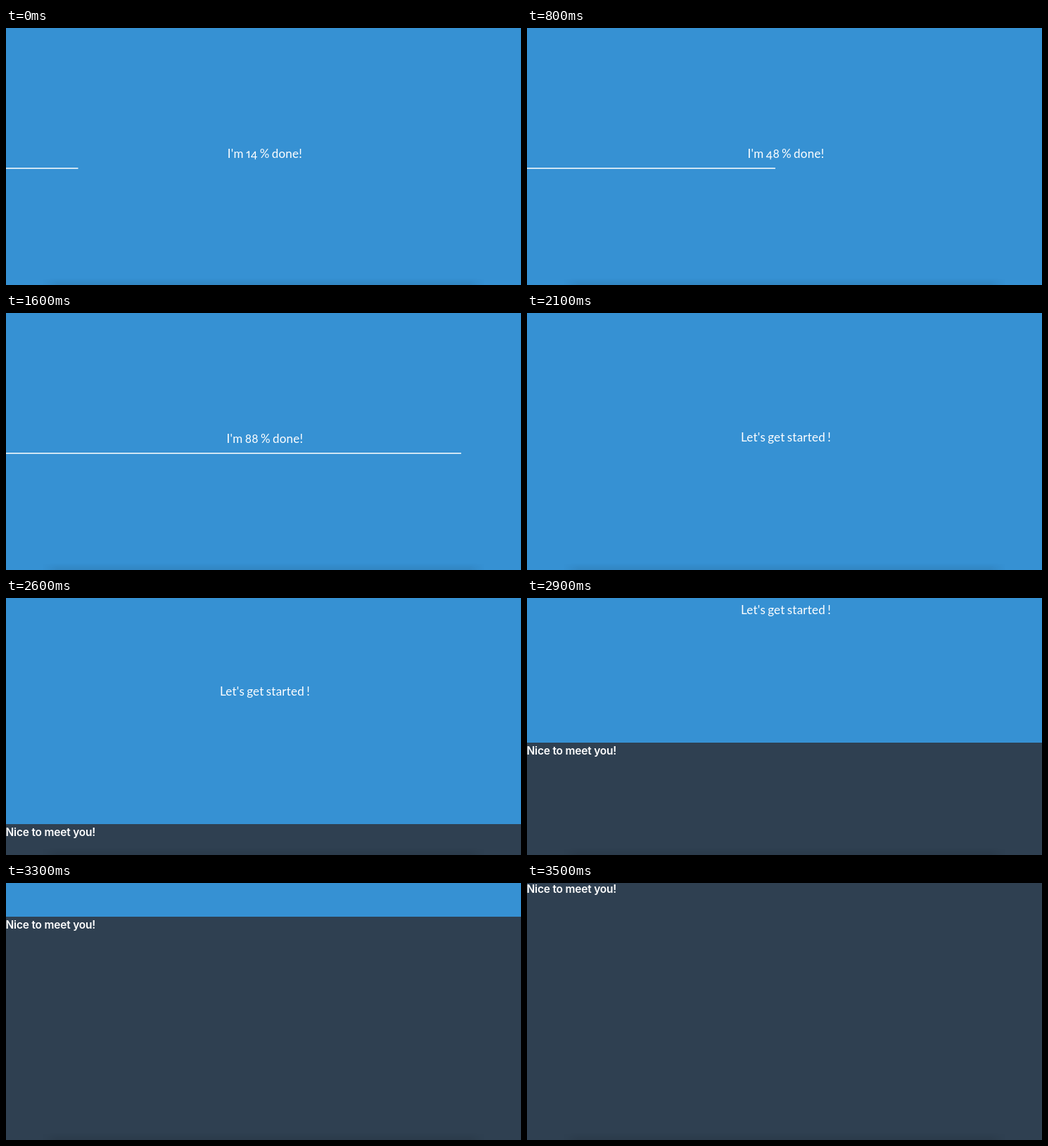
Recreate the animation shown at these times as an HTML page. Size 732 by 366 pixels, loop 4500 ms.

```html
<!DOCTYPE html>
<html lang="en">
<head>
<meta charset="utf-8">
<title>Loading</title>
<style>
  html, body { margin: 0; width: 100%; height: 100%; overflow: hidden; background: #2f4051; }
  svg { display: block; width: 732px; height: 366px; }
  text { fill: #fff; white-space: pre; }
  .status { font: 400 17px Lato, sans-serif; letter-spacing: .25px; word-spacing: -1.5px; font-variant-numeric: oldstyle-nums proportional-nums; text-anchor: middle; }
  .greeting { font: 600 15.5px Inter, sans-serif; letter-spacing: -.2px; }
</style>
</head>
<body>
<svg viewBox="0 0 732 366">
  <defs>
    <linearGradient id="shade" x2="0" y2="1">
      <stop offset="0" stop-color="#000" stop-opacity="0"/>
      <stop offset=".5" stop-color="#000" stop-opacity=".045"/>
      <stop offset="1" stop-color="#000" stop-opacity=".075"/>
    </linearGradient>
    <linearGradient id="sides">
      <stop offset=".07" stop-color="#000"/>
      <stop offset=".1" stop-color="#fff"/>
      <stop offset=".9" stop-color="#fff"/>
      <stop offset=".93" stop-color="#000"/>
    </linearGradient>
    <mask id="fade"><rect y="350" width="732" height="16" fill="url(#sides)"/></mask>
  </defs>
  <g id="page">
    <rect width="732" height="366" fill="#3691d3"/>
    <rect y="366" width="732" height="380" fill="#2f4051"/>
    <rect id="bar" y="199" height="1.5" fill="#fff"/>
    <text id="status" class="status" x="368"></text>
    <text class="greeting" x="-.5" y="382.5">Nice to meet you!</text>
  </g>
  <rect y="356" width="732" height="10" fill="url(#shade)" mask="url(#fade)"/>
</svg>
<script>
  const LOOP = 4500, STEP = 100, WIDTH = 732, DONE = 1900;
  const [page, bar, status] = ['page', 'bar', 'status'].map(id => document.getElementById(id));

  // [time, value] points, linear in between
  const barPath = [[100, 102.5], [800, 353], [1300, 530], [1600, 647], [1800, 725], [1900, WIDTH]];
  const barFade = [[1800, 1], [2100, 0]];
  const scrollPath = [[2400, 0], [2500, 13], [2600, 44], [2900, 160], [3000, 199],
                      [3100, 242], [3300, 318], [3400, 352], [3500, 369]];

  function valueAt(points, t) {
    if (t <= points[0][0]) return points[0][1];
    for (let i = 1; i < points.length; i++) {
      const [t0, v0] = points[i - 1], [t1, v1] = points[i];
      if (t <= t1) return v0 + (v1 - v0) * (t - t0) / (t1 - t0);
    }
    return points[points.length - 1][1];
  }

  function draw(now) {
    const t = Math.floor(now % LOOP / STEP) * STEP;
    const width = valueAt(barPath, t);
    const done = t >= DONE;
    const label = done ? "Let's get started !" : `I'm ${Math.floor(width / WIDTH * 100)} % done!`;

    bar.setAttribute('width', width);
    bar.setAttribute('opacity', valueAt(barFade, t));
    if (status.textContent !== label) status.textContent = label;
    status.setAttribute('y', done ? 182.7 : 184.5);
    page.setAttribute('transform', `translate(0 ${-valueAt(scrollPath, t)})`);
  }

  const start = performance.now();
  function tick() {
    draw(performance.now() - start);
    requestAnimationFrame(tick);
  }
  tick();
</script>
</body>
</html>
```
